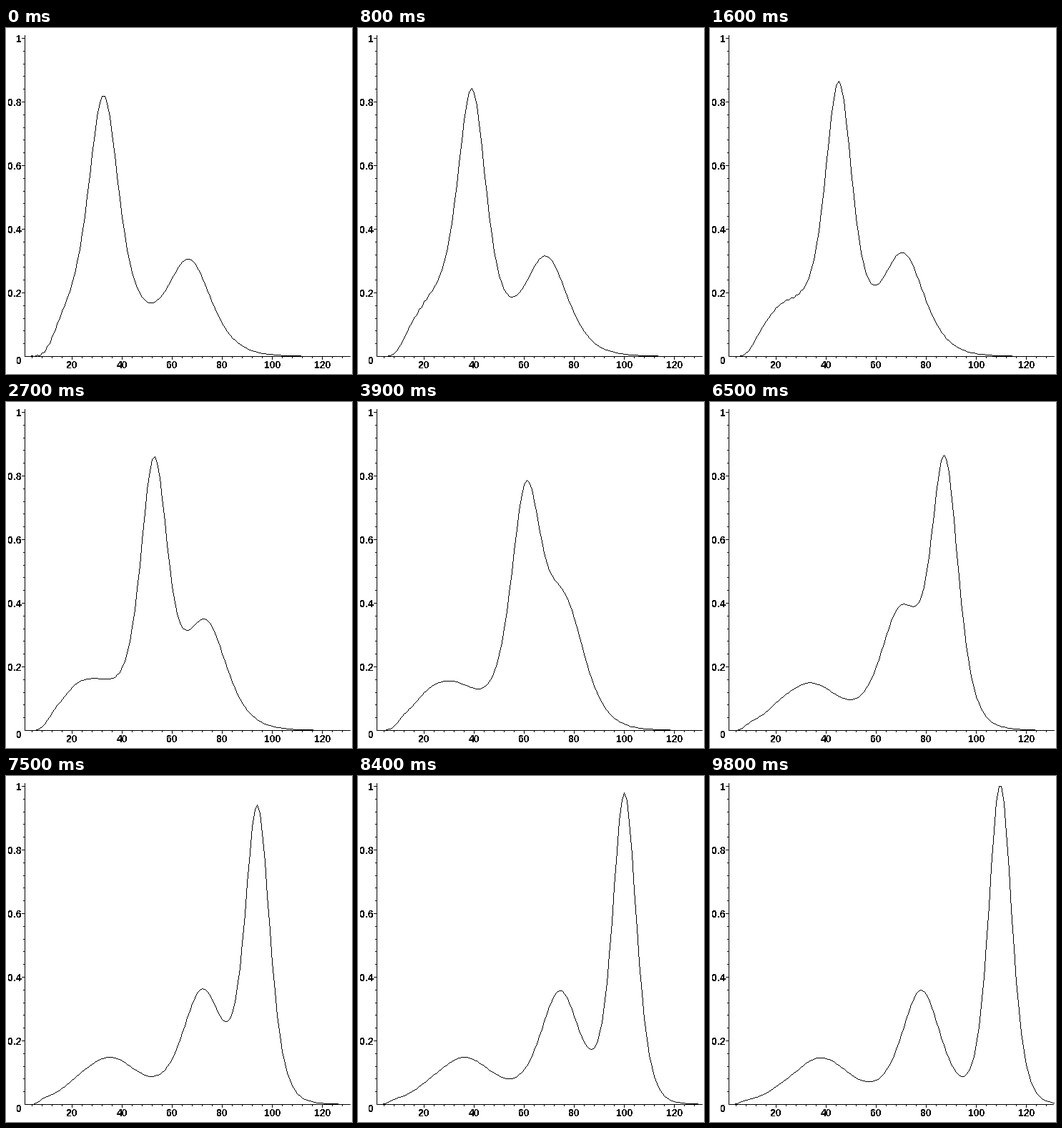
Animation, 484 px wide and 484 px high, one loop 9.9 s. Source, as a matplotlib script:

```python
from itertools import product

import matplotlib.pyplot as plt
import numpy as np
from matplotlib.animation import FuncAnimation

SIZE, DPI = 484, 100
FRAMES, INTERVAL = 99, 100
PX = 72 / DPI  # one pixel in points

plt.rcParams["font.family"] = "Liberation Sans"
plt.rcParams["text.antialiased"] = False

# Three solitons: wave numbers, starting offsets and speeds
ALPHA = 37.5
K = np.array([0.0622, 0.1, 0.165])
START = np.array([24.5, 37.1, 29.6])
SPEED = np.array([0.135, 0.266, 0.679])
SUBSETS = [np.array(s) for s in product((0, 1), repeat=3)]
NODES = np.arange(1, 132)


def coupling(subset):
    """Interaction factor of the solitons present in a subset."""
    factor = 1.0
    for i in range(3):
        for j in range(i):
            if subset[i] and subset[j]:
                factor *= ((K[i] - K[j]) / (K[i] + K[j])) ** 2
    return factor


RATES = np.array([2 * (s @ K) for s in SUBSETS])[:, None]
COUPLINGS = np.array([coupling(s) for s in SUBSETS])[:, None]


def solitons(x, t):
    """Second log-derivative of the tau function, as a variance of rates."""
    centers = START + SPEED * t
    shifts = np.array([2 * (s * K) @ centers for s in SUBSETS])[:, None]
    weights = COUPLINGS * np.exp(RATES * x - shifts)
    weights /= weights.sum(axis=0)
    mean = (weights * RATES).sum(axis=0)
    return ALPHA * (weights * (RATES - mean) ** 2).sum(axis=0)


def profile(t):
    x = NODES
    u = solitons(x, t) * (1 - 0.035 * np.exp(-t / 25))
    # slow swell near the left wall, where the height is held at zero
    swell = 0.032 * np.exp(-t / 50) * (1 - np.exp(-t / 8))
    u += swell * np.exp(-((x - 21) / 6) ** 2)
    u *= 1 - np.exp(-((x - 1) / (11 - 0.07 * t)) ** 4)
    # fine grid ripple drifting to the right
    ripple = 0.003 * np.exp(-t / 30) * np.exp(-((x - 9 - 1.15 * t) / 5) ** 2)
    return u + ripple * (-1.0) ** x


def nearest(v):
    return np.floor(np.asarray(v) + 0.5).astype(int)


def to_col(x):
    return nearest(22 + 3.5 * x)


def to_row(u):
    return nearest(459 - 445 * u)


def trace(cols, rows):
    """Mask of a one-pixel line through the given pixels."""
    mask = np.zeros((SIZE, SIZE))
    for c0, r0, c1, r1 in zip(cols, rows, cols[1:], rows[1:]):
        count = max(abs(c1 - c0), abs(r1 - r0)) + 1
        mask[nearest(np.linspace(r0, r1, count)),
             nearest(np.linspace(c0, c1, count))] = 1
    return mask


fig = plt.figure(figsize=(SIZE / DPI, SIZE / DPI), dpi=DPI, facecolor="white")
ax = fig.add_axes([0, 0, 1, 1])
ax.axis("off")
curve = ax.imshow(np.zeros((SIZE, SIZE)), cmap="gray_r", vmin=0, vmax=1,
                  extent=(0, SIZE, SIZE, 0), interpolation="nearest",
                  aspect="auto")
ax.set_xlim(0, SIZE)
ax.set_ylim(SIZE, 0)


def stroke(xs, ys):
    ax.plot(xs, ys, color="black", lw=PX, snap=False,
            solid_capstyle="butt")


def label(x, y, text, align):
    ax.text(x, y, text, ha=align, va="center_baseline", color="black",
            fontsize=14 * PX, fontweight="bold")


stroke([26.5, 26.5], [10, 460])
stroke([26, 481], [459.5, 459.5])

for i in range(1, 33):
    x = to_col(4 * i) + 0.5
    major = i % 5 == 0
    stroke([x, x], [460, 464 if major else 462])
    if major:
        label(x, 470, str(4 * i), "center")

for i in range(1, 26):
    y = to_row(0.04 * i) + 0.5
    major = i % 5 == 0
    stroke([22 if major else 24, 26], [y, y])
    if major:
        label(22, y, f"{0.04 * i:.1g}", "right")
label(22, 464.5, "0", "right")


def update(frame):
    curve.set_data(trace(to_col(NODES), to_row(profile(frame))))
    return (curve,)


anim = FuncAnimation(fig, update, frames=FRAMES, interval=INTERVAL,
                     repeat=True, repeat_delay=0)
plt.show()
```
